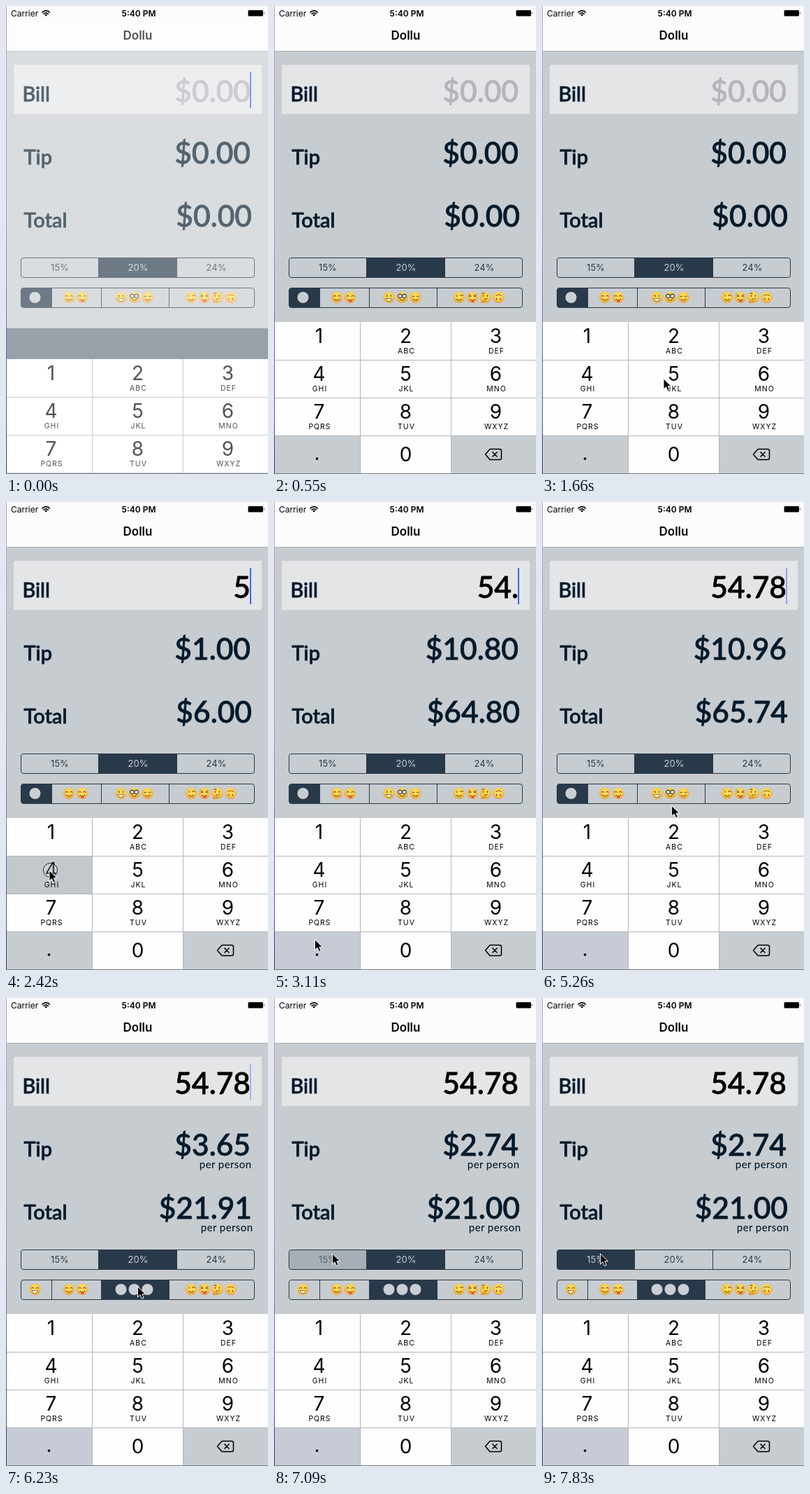
These frames come from a looping animation (375x668 px, 8 s). An HTML page:

```html
<!DOCTYPE html>
<html lang="en">
<head>
<meta charset="utf-8">
<title>Tip calculator</title>
<style>
  html, body { margin: 0; width: 100%; height: 100%; overflow: hidden; background: #c7ccd0; }
  svg { display: block; width: 375px; height: 668px; }
  text { font-family: Inter, Roboto, sans-serif; }
  .mid { text-anchor: middle; }
  .lato { font-family: Lato, sans-serif; font-weight: 500; color: #041a2b; fill: currentColor; }
  .label, .amount { stroke: currentColor; stroke-width: .8; }
  .label { font-size: 29px; }
  .amount { font-size: 42.5px; text-anchor: end; }
  .each { font-size: 15px; letter-spacing: .4px; text-anchor: end; }
  .digit { font-size: 28px; text-anchor: middle; }
  .letters { font-size: 10.5px; letter-spacing: 1px; text-anchor: middle; }
  .ink { fill: none; stroke: #7d5019; stroke-width: 1.1; stroke-linecap: round; }
</style>
</head>
<body>
<svg viewBox="0 0 375 668">
  <defs>
    <linearGradient id="edge" x2="0" y2="1">
      <stop offset="0" stop-color="#b9a0c8"/>
      <stop offset=".45" stop-color="#c48fbd"/>
      <stop offset=".75" stop-color="#5a5fb8"/>
      <stop offset="1" stop-color="#34306e"/>
    </linearGradient>
    <radialGradient id="skin" cy=".4">
      <stop offset="0" stop-color="#ffe36b"/>
      <stop offset=".7" stop-color="#fdd04c"/>
      <stop offset="1" stop-color="#efa93a"/>
    </radialGradient>
  </defs>
  <rect width="375" height="668" fill="#c7ccd0"/>

  <rect width="375" height="64" fill="#fcfcfc"/>
  <path d="M0 64.5H375" stroke="#b0b3b6"/>
  <text x="7" y="14.500" font-size="12">Carrier</text>
  <g fill="none" stroke="#000" stroke-width="1.7">
    <path d="M51.500 9.300Q57.200 4 62.900 9.300M53.600 11.600Q57.200 8.300 60.800 11.600"/>
  </g>
  <path d="M55.300 12.700Q57.200 11 59.100 12.700L57.200 14.700Z"/>
  <text class="mid" x="190" y="14.500" font-size="12" font-weight="600">5:40 PM</text>
  <rect x="346.500" y="6" width="21.500" height="8.500" rx="1.500"/>
  <path d="M369 8.500q1.600 1.700 0 3.400z"/>
  <text class="mid" x="188.500" y="48" font-size="17" font-weight="600">Dollu</text>

  <rect x="11" y="84" width="355" height="70" fill="#e3e5e7"/>
  <text class="lato label" x="23.500" y="135.500">Bill</text>
  <text class="lato label" x="25.500" y="225.500">Tip</text>
  <text class="lato label" x="25.500" y="315.500">Total</text>
  <text class="lato amount" id="bill" x="350" y="136.500"></text>
  <text class="lato amount" id="tip" x="350" y="225"></text>
  <text class="lato amount" id="total" x="352" y="315"></text>
  <g id="perPerson">
    <text class="lato each" x="351.500" y="242.500">per person</text>
    <text class="lato each" x="353.500" y="332.500">per person</text>
  </g>
  <rect id="caret" x="349" y="94" width="2" height="52" fill="#4468ec"/>
  <g id="segments"></g>

  <rect id="backdrop" y="460" width="375" fill="#68747e"/>
  <g id="keypad"></g>
  <rect id="veil" x="1" y="20" width="374" height="648" fill="#fff"/>
  <rect width="1" height="668" fill="url(#edge)"/>
  <path d="M0 667.500H375" stroke="#777a80"/>

  <g id="cursor">
    <circle id="ring" cx="1.500" cy="-.5" r="10" fill="#fff" fill-opacity=".25" stroke="#222"/>
    <path d="M0 0V15L3.500 11.700L6 17.300L8.700 16.100L6.300 10.700H11Z" stroke="#fff"/>
  </g>
</svg>
<script>
const LOOP = 8000, DARK = '#283a49', PALE = '#c9ced2';
const el = id => document.getElementById(id);
const clamp = v => Math.max(0, Math.min(1, v));
const ramp = (t, start, length) => clamp((t - start) / length);
const ease = p => p * p * (3 - 2 * p);

// Faces are drawn around 0,0 with radius 8.
const eyes = '<path stroke-width="1.500" d="M-2.800-3v1.500M2.800-3v1.500"/>';
const arcs = '<path d="M-5-1.500q1.700-2.500 3.400 0M1.600-1.500q1.700-2.500 3.400 0"/>';
const smile = '<path d="M-3.500 2.500Q0 5.500 3.500 2.500"/>';
const grin = '<path fill="#fff" stroke-width=".8" d="M-4 1.500H4Q3.500 5.500 0 5.500T-4 1.500Z"/>';
const tongue = '<path fill="#e8505b" stroke="none" d="M-1.500 3.500H2.500V6Q.500 8-1.500 6Z"/>';
const blush = '<path stroke="#f7a05c" stroke-width="2.500" d="M-5 1.500h.1M5 1.500h.1"/>';
const features = {
  beam: arcs + grin,
  shy: blush + arcs + smile,
  yum: arcs + smile + tongue,
  happy: eyes + grin,
  nerd: '<g fill="#fff" stroke="#333"><circle cx="-3" cy="-2" r="2.600"/><circle cx="3" cy="-2" r="2.600"/></g><path d="M-3-2h.1M3-2h.1"/>' + smile,
  calm: '<path d="M-5-2q1.700 2 3.400 0M1.600-2q1.700 2 3.400 0"/>' + smile,
  wink: '<path d="M-3-3.500v2M1.500-2.500q2-1.500 4 0"/>' + smile,
  cheeky: '<path d="M-5-4l3 2l-3 1M5-4l-3 2l3 1"/>' + smile + tongue,
  think: eyes + '<path d="M-2 2.500L3 1.500M-5-5.500q2-1.500 3.500 0"/><path fill="#f3a534" stroke="#d98f2c" d="M-6 7L-4 4L1 4.500L-2 7.500Z"/>',
  flipped: `<g transform="rotate(180)">${eyes}${smile}</g>`
};
const face = (x, kind) => `<g transform="translate(${x} 416)"><circle r="8" fill="url(#skin)"/><g class="ink">${features[kind]}</g></g>`;
const faces = (xs, kinds) => ({
  off: xs.map((x, i) => face(x, kinds[i])).join(''),
  on: xs.map(x => `<circle cx="${x}" cy="416" r="8" fill="${PALE}"/>`).join('')
});
const percent = (x, label) => {
  const draw = color => `<text class="mid" x="${x}" y="378" font-size="13" fill="${color}">${label}</text>`;
  return { off: draw(DARK), on: draw(PALE) };
};

function makeSegments(id, top, edges, cells) {
  const parts = cells.map(({ off, on }, i) =>
    `<g><rect x="${edges[i]}" y="${top}" width="${edges[i + 1] - edges[i]}" height="28" fill="${DARK}"/>` +
    `<g>${off}</g><g>${on}</g></g>`).join('');
  const dividers = edges.slice(1, -1).map(x => `M${x} ${top}v28`).join('');
  const box = `x="21.500" y="${top}" width="334" height="28" rx="3.500"`;
  el('segments').insertAdjacentHTML('beforeend',
    `<clipPath id="${id}Clip"><rect ${box}/></clipPath><g id="${id}" clip-path="url(#${id}Clip)">${parts}</g>` +
    `<rect ${box} fill="none" stroke="${DARK}"/><path d="${dividers}" stroke="${DARK}"/>`);
}
makeSegments('rate', 359.5, [21.5, 132.5, 244.5, 355.5],
  [percent(77, '15%'), percent(189, '20%'), percent(301, '24%')]);
makeSegments('party', 402.5, [21.5, 65.5, 136.5, 233.5, 355.5], [
  faces([41.5], ['beam']),
  faces([90, 109], ['shy', 'yum']),
  faces([164.5, 183.5, 202.5], ['happy', 'nerd', 'calm']),
  faces([265, 284, 302.5, 321.5], ['wink', 'cheeky', 'think', 'flipped'])
]);

function makeKeypad() {
  const keys = ['1', '2 ABC', '3 DEF', '4 GHI', '5 JKL', '6 MNO', '7 PQRS', '8 TUV', '9 WXYZ', '.', '0', '<'];
  const lefts = [0, 123.5, 253.5, 375], centers = [64.5, 188.5, 317.5];
  let html = '';
  keys.forEach((key, i) => {
    const [digit, letters = ''] = key.split(' ');
    const col = i % 3, top = 451 + 54 * Math.floor(i / 3);
    const gray = digit === '.' || digit === '<';
    html += `<rect data-key="${digit}" x="${lefts[col]}" y="${top}" width="${lefts[col + 1] - lefts[col]}" height="55" fill="${gray ? '#c7ccd0' : '#fefefe'}"/>`;
    if (digit === '<') {
      html += '<path d="M309 632.500H323Q325.500 632.500 325.500 635V645Q325.500 647.500 323 647.500H309L302.500 640ZM312.500 636.500l7 7m0-7l-7 7" fill="none" stroke="#000" stroke-width="1.500" stroke-linejoin="round"/>';
    } else {
      const x = digit === '.' ? 61.5 : centers[col];
      html += `<text class="digit" x="${x}" y="${top + (i < 9 ? 30 : digit === '.' ? 35 : 37)}">${digit}</text>` +
        `<text class="letters" x="${centers[col] + 1}" y="${top + 45}">${letters}</text>`;
    }
  });
  el('keypad').innerHTML = html +
    '<path d="M0 505.500H375M0 559.500H375M0 613.500H375M123.500 451V668M253.500 451V668" fill="none" stroke="#b3b6ba"/>';
}
makeKeypad();

// [key, mouse down, mouse up]
const presses = [['5', 1960, 2080], ['4', 2420, 2540], ['.', 2920, 3050], ['7', 3620, 3740], ['8', 4100, 4262]];
const PARTY_CLICK = [5480, 5590], RATE_CLICK = [7020, 7090];
const clicks = [...presses.map(p => p.slice(1)), PARTY_CLICK, RATE_CLICK];
const caretToggles = [325, 820, 1315, 1810, 3530, 3680, 4680, 5185, 5670, 6175, 6660, 7165, 7650];
const cursorPath = [
  [1490, 236, 452], [1650, 174, 532], [2160, 174, 532], [2380, 62, 526], [2680, 62, 526],
  [2880, 58.5, 624.5], [3170, 58.5, 624.5], [3440, 66, 572], [3840, 66, 572], [4080, 168, 565.5],
  [4680, 168, 565.5], [5440, 188.5, 412], [6250, 188.5, 412], [6850, 83.5, 365]
];

function cursorAt(t) {
  let [, x, y] = cursorPath[0];
  for (let i = 1; i < cursorPath.length; i++) {
    const [start] = cursorPath[i - 1], [end, nx, ny] = cursorPath[i];
    const p = ease(ramp(t, start, end - start));
    x += (nx - x) * p;
    y += (ny - y) * p;
  }
  return [x, y];
}

function showSegments(id, levels) {
  [...el(id).children].forEach((cell, i) => {
    const [fill, off, on] = cell.children, v = levels[i] || 0;
    fill.setAttribute('opacity', v);
    off.setAttribute('opacity', 1 - v);
    on.setAttribute('opacity', v);
  });
}
const pressThenSelect = (t, [down, up]) =>
  Math.max(t >= down ? .2 : 0, ramp(t, up, 200));

function render(t) {
  const typed = presses.filter(p => t >= p[2]).map(p => p[0]).join('');
  const amount = parseFloat(typed) || 0;
  const split = t >= PARTY_CLICK[1], people = split ? 3 : 1;
  const tip = amount * (t >= RATE_CLICK[1] ? .15 : .2);
  const dollars = v => '$' + (v / people).toFixed(2);
  el('bill').textContent = typed || '$0.00';
  el('bill').style.color = typed ? '#000' : '#b2b5bb';
  el('tip').textContent = dollars(tip);
  el('total').textContent = dollars(amount + tip);
  el('perPerson').style.display = split ? '' : 'none';

  const caret = caretToggles.reduce((v, at, i) => v + (i % 2 - v) * ramp(t, at, 150), 1);
  el('caret').setAttribute('opacity', caret);

  const three = ramp(t, PARTY_CLICK[1], 200), low = ramp(t, RATE_CLICK[1], 160);
  showSegments('party', [1 - three, 0, pressThenSelect(t, PARTY_CLICK), 0]);
  showSegments('rate', [pressThenSelect(t, RATE_CLICK), 1 - low, 0]);

  const intro = ramp(t, 30, 500), slide = 53 * (1 - intro) ** 3;
  el('keypad').setAttribute('transform', `translate(0 ${slide})`);
  el('backdrop').setAttribute('height', Math.max(0, slide - 9));
  el('veil').setAttribute('opacity', .32 * (1 - intro));
  for (const [key, down, up] of presses) {
    const dot = key === '.';
    const held = t >= down && t < up + (dot ? 0 : 65);
    const idle = dot ? (t > up ? '#c7cbd6' : '#c7ccd0') : '#fefefe';
    const lit = dot ? '#fefefe' : '#c3c8cc';
    document.querySelector(`[data-key="${key}"]`).setAttribute('fill', held ? lit : idle);
  }

  el('cursor').style.display = t < cursorPath[0][0] ? 'none' : '';
  el('cursor').setAttribute('transform', `translate(${cursorAt(t)})`);
  el('ring').style.display = clicks.some(([down, up]) => t >= down && t < up) ? '' : 'none';
}

const begin = performance.now();
(function frame() {
  render((performance.now() - begin) % LOOP);
  requestAnimationFrame(frame);
})();
</script>
</body>
</html>
```
